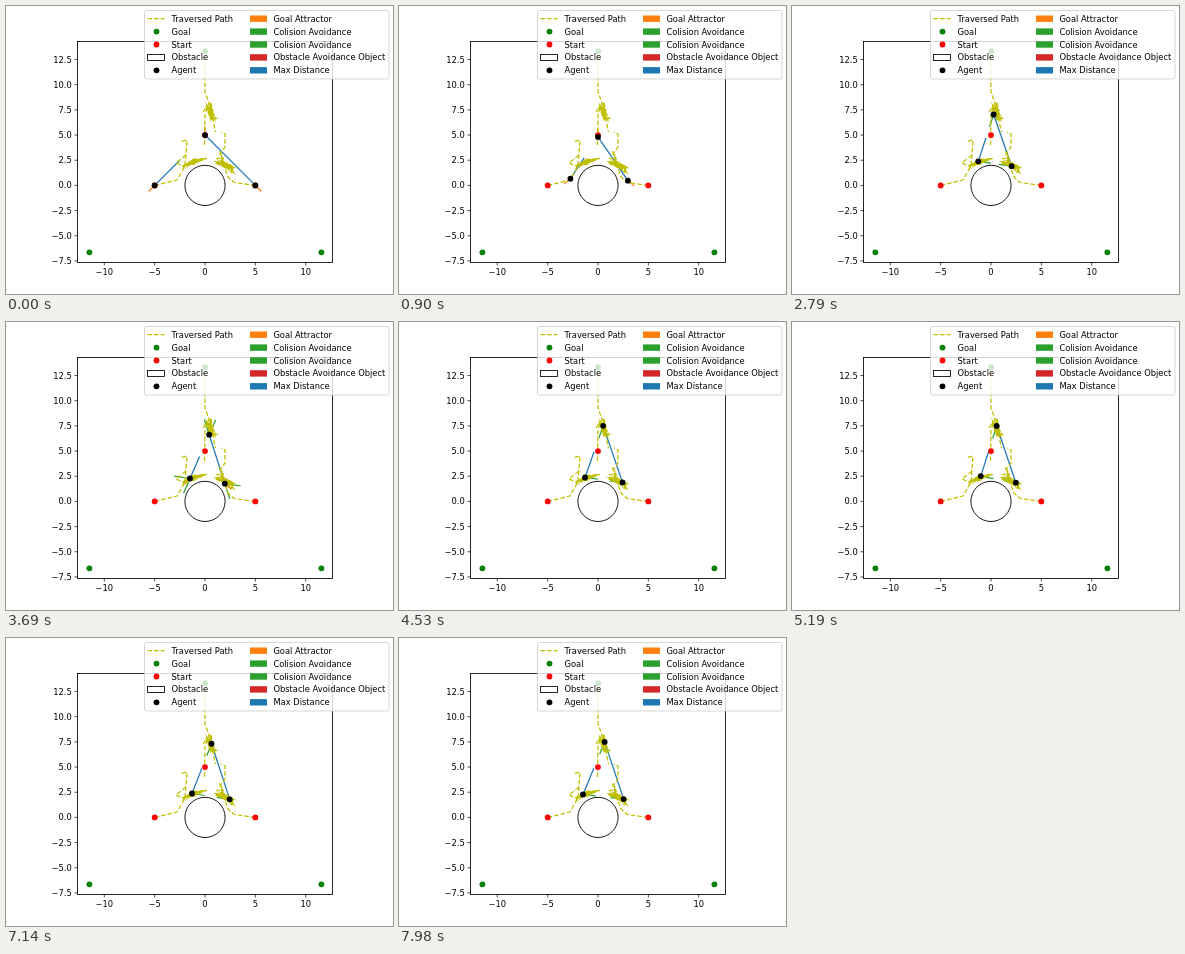
An HTML page with a canvas that plays this animation: 387 px wide and 288 px high, repeating every 8000 ms.

```html
<!DOCTYPE html>
<html lang="en">
<head>
<meta charset="utf-8">
<title>Multi-agent potential field</title>
<style>
  html, body { margin: 0; width: 100%; height: 100%; overflow: hidden; background: #fff; }
  canvas { display: block; }
</style>
</head>
<body>
<canvas id="plot" width="387" height="288"></canvas>
<script>
const ctx = document.getElementById('plot').getContext('2d');
const LOOP = 8000, STEP = 30, ARRIVAL = 1860;
const BLUE = '#1f77b4', ORANGE = '#ff7f0e', GREEN = '#2ca02c', RED = '#d62728', YELLOW = '#bfbf00';
const GOAL = '#008000', START = '#f00';
const px = x => 199 + x * 10.07, py = y => 179.4 - y * 10.07;
const wave = (t, period, peak) => Math.cos((t - peak) / period * Math.PI * 2);
const drift = t => 1 - Math.exp((ARRIVAL - t) / 2000);

// each agent curves in from its start, then hovers around a meeting point
const agents = [
  { start: [px(-5), py(0)], bend: [175, 178], goal: [83.4, 246.3],
    hover: t => [187 - 3 * wave(t, 4290, 3690), 155 + 1.5 * wave(t, 4290, 3690)] },
  { start: [px(5), py(0)], bend: [222, 180], goal: [315.4, 246.3],
    hover: t => [218 + 5 * drift(t) - 2.5 * wave(t, 2800, 6250), 159 + 3 * drift(t) + wave(t, 2800, 6250)] },
  { start: [px(0), py(5)], bend: [199, 145], goal: [199.2, 45.2],
    hover: t => [199 + 7 * drift(t), 108 + 5.5 * wave(t, 2800, 6250)] }
];

function positionAt({ start, bend, hover }, t) {
  if (t >= ARRIVAL) return hover(t);
  const u = t / ARRIVAL, end = hover(ARRIVAL);
  return start.map((s, i) => (1 - u) ** 2 * s + 2 * u * (1 - u) * bend[i] + u * u * end[i]);
}

let seed = 7;
const random = () => (seed = seed * 16807 % 2147483647) / 2147483647;

// zigzag scattered around the segment a-b
function scribble(a, b, spread, count) {
  const dx = b[0] - a[0], dy = b[1] - a[1], len = Math.hypot(dx, dy);
  return Array.from({ length: count }, () => {
    const u = random(), v = (random() - 0.5) * spread;
    return [a[0] + dx * u - dy / len * v, a[1] + dy * u + dx / len * v];
  });
}

const paths = [
  [agents[0].start, [171, 174], [179, 160], [181, 134], [175, 135.5]],
  [[180, 149], [170, 157], [179, 161]],
  scribble([176, 161], [192, 154], 5, 36),
  scribble([184, 155], [201, 153], 2, 12),
  [agents[1].start, [228, 176.5], [222, 171], [214, 148], [219, 141], [219, 128], [215, 126]],
  scribble([210, 154], [229, 164], 6, 42),
  scribble([213, 142], [217, 157], 3, 7),
  [[198.5, 139], [199, 108], [203, 97], [199, 86], [198.5, 45]],
  [[197, 106], [201, 100], [206, 110], [209.5, 126]],
  scribble([202, 98], [208, 114], 6, 34)
];

function line(points, color, width = 1.25, dash = []) {
  ctx.beginPath();
  points.forEach(p => ctx.lineTo(...p));
  ctx.strokeStyle = color;
  ctx.lineWidth = width;
  ctx.setLineDash(dash);
  ctx.stroke();
  ctx.setLineDash([]);
}

const dashed = points => line(points, YELLOW, 1.25, [4.6, 2]);

function box(x, y, w, h) {
  ctx.strokeStyle = '#000';
  ctx.lineWidth = 0.85;
  ctx.strokeRect(x, y, w, h);
}

function dot([x, y], color) {
  ctx.beginPath();
  ctx.arc(x, y, 2.9, 0, Math.PI * 2);
  ctx.fillStyle = color;
  ctx.fill();
}

function label(text, x, y, align = 'left') {
  ctx.font = '8.33px "DejaVu Sans", sans-serif';
  ctx.textAlign = align;
  ctx.fillStyle = '#000';
  ctx.fillText(text, x, y);
}

function drawAxes() {
  for (let v = -10; v <= 10; v += 5) {
    line([[px(v), 256.5], [px(v), 259.5]], '#000', 0.7);
    label(String(v).replace('-', '−'), px(v), 269, 'center');
  }
  for (let v = -7.5; v <= 12.5; v += 2.5) {
    line([[68.5, py(v)], [71.5, py(v)]], '#000', 0.7);
    label(v.toFixed(1).replace('-', '−'), 65.8, py(v) + 3, 'right');
  }
  box(71.5, 35.5, 255, 221);
}

function drawLegend() {
  ctx.beginPath();
  ctx.roundRect(138.5, 4.5, 244.5, 68.5, 2);
  ctx.fillStyle = 'rgba(255,255,255,.8)';
  ctx.fill();
  ctx.strokeStyle = 'rgba(204,204,204,.8)';
  ctx.lineWidth = 1;
  ctx.stroke();

  const rowY = i => 12.7 + i * 12.9;
  ['Traversed Path', 'Goal', 'Start', 'Obstacle', 'Agent']
    .forEach((text, i) => label(text, 165.5, rowY(i) + 3));
  dashed([[141.5, rowY(0)], [158.5, rowY(0)]]);
  [GOAL, START].forEach((color, i) => dot([150.5, rowY(i + 1)], color));
  box(141.5, 48.5, 17, 6);
  dot([150.5, rowY(4)], '#000');

  [['Goal Attractor', ORANGE], ['Colision Avoidance', GREEN], ['Colision Avoidance', GREEN],
   ['Obstacle Avoidance Object', RED], ['Max Distance', BLUE]].forEach(([text, color], i) => {
    ctx.fillStyle = color;
    ctx.fillRect(244, rowY(i) - 3.2, 17, 6.4);
    label(text, 267.4, rowY(i) + 3);
  });
}

// vector of a given length; negative lengths point away from the other end
function arrow(from, to, length, color) {
  const dx = to[0] - from[0], dy = to[1] - from[1], k = length / Math.hypot(dx, dy);
  line([from, [from[0] + dx * k, from[1] + dy * k]], color);
}

function drawForces(t, spots) {
  const [left, right, top] = spots;
  const arrived = t >= ARRIVAL;
  const burst = arrived && (t - ARRIVAL + 150) % 660 < 90;
  if (!arrived || burst) spots.forEach((p, i) => arrow(p, agents[i].goal, 8.5, ORANGE));
  line([left, [(left[0] + top[0]) / 2, (left[1] + top[1]) / 2]], BLUE);
  line([top, right], BLUE);
  if (!arrived) return;
  spots.forEach((p, i) => {
    const others = spots.filter((_, n) => n !== i);
    if (burst) others.forEach(other => arrow(p, other, -16, GREEN));
    else arrow(p, others[0], 13, GREEN);
  });
}

function draw(now) {
  const t = Math.floor(now % LOOP / STEP) * STEP;
  const spots = agents.map(agent => positionAt(agent, t));
  ctx.fillStyle = '#fff';
  ctx.fillRect(0, 0, 387, 288);
  drawAxes();
  ctx.beginPath();
  ctx.arc(px(0), py(0), 20.1, 0, Math.PI * 2);
  ctx.strokeStyle = '#000';
  ctx.lineWidth = 0.9;
  ctx.stroke();
  drawForces(t, spots);
  paths.forEach(dashed);
  agents.forEach(({ start, goal }) => { dot(goal, GOAL); dot(start, START); });
  spots.forEach(p => dot(p, '#000'));
  drawLegend();
  requestAnimationFrame(draw);
}
requestAnimationFrame(draw);
</script>
</body>
</html>
```
